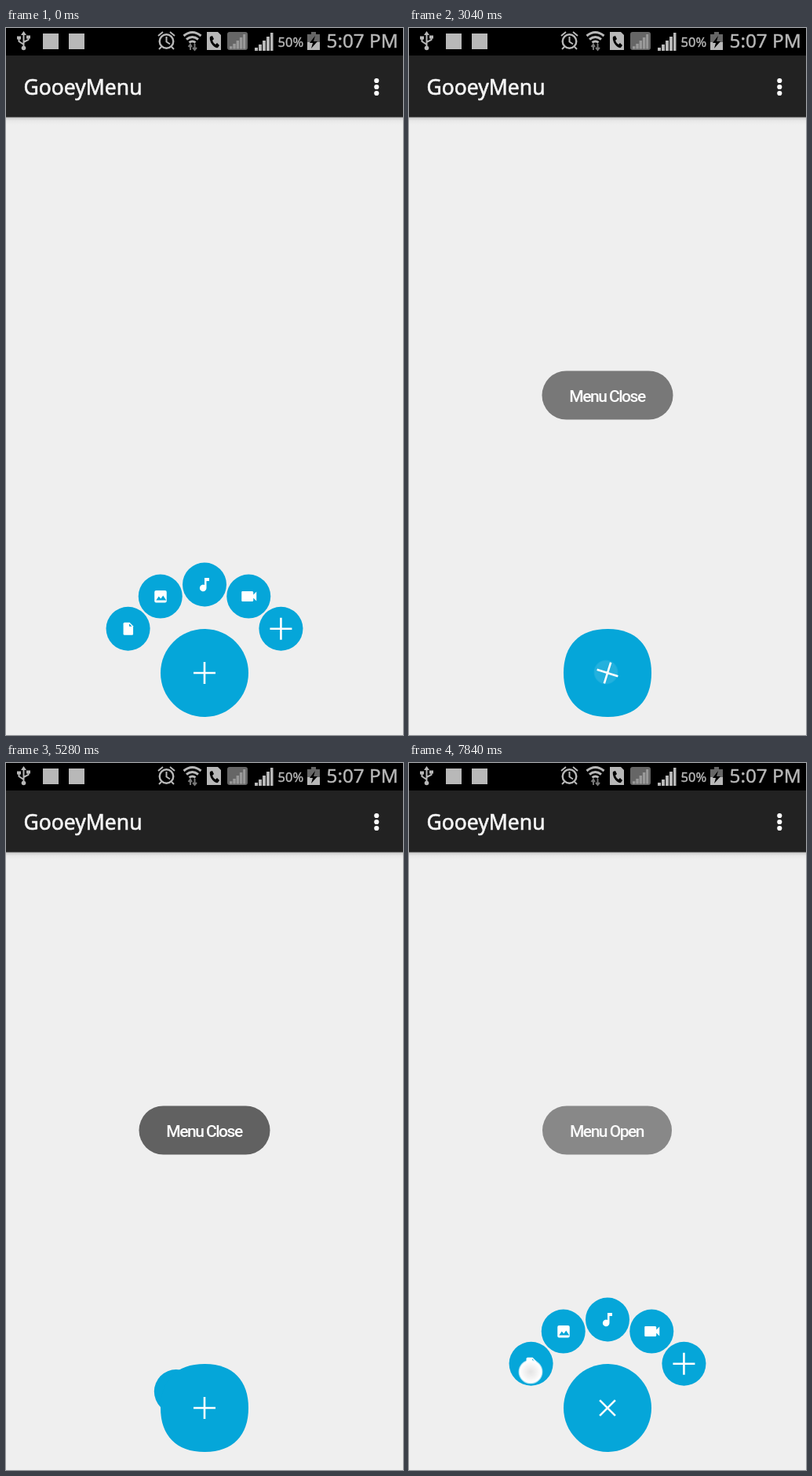
Animation, 506 px wide and 900 px high, one loop 8 s. Source, as an HTML page:

```html
<!DOCTYPE html>
<html lang="en">
<head>
<meta charset="utf-8">
<title>GooeyMenu</title>
<style>
  html, body { margin: 0; width: 100%; height: 100%; overflow: hidden; background: #efefef; }
  svg { display: block; width: 506px; height: 900px; }
  .bar { font-family: "Noto Sans", sans-serif; fill: #b8b8b8; }
  .bar text { stroke: #b8b8b8; stroke-width: .4; }
  .title { font: 26.5px "Noto Sans", sans-serif; fill: #f6f6f6; stroke: #f6f6f6; stroke-width: .6; }
  .toast text { font: 500 21px Roboto, sans-serif; letter-spacing: -1.5px; fill: #fff; text-anchor: middle; }
  .toast rect { fill: #616161; }
  .blue { fill: #05a6d9; }
  .plus { stroke: #fff; stroke-width: 2.6; fill: none; }
  .line { stroke: #b8b8b8; stroke-width: 2; fill: none; }
</style>
</head>
<body>
<svg viewBox="0 0 506 900">
  <defs>
    <linearGradient id="shade" x2="0" y2="1">
      <stop stop-color="#a8a8a8"/>
      <stop offset=".2" stop-color="#d2d2d2"/>
      <stop offset=".5" stop-color="#e8e8e8"/>
      <stop offset="1" stop-color="#efefef"/>
    </linearGradient>
    <radialGradient id="glow">
      <stop stop-color="#e4e4e4"/>
      <stop offset=".55" stop-color="#f4f4f4"/>
      <stop offset=".88" stop-color="#fff"/>
      <stop offset="1" stop-color="#fff" stop-opacity=".5"/>
    </radialGradient>
    <path id="bars" d="M0 23v-4h4v4zM5 23v-8h4v8zM10 23v-13h4v13zM15 23v-18h4v18zM20 23v-23h3.500v23z"/>
  </defs>

  <rect width="506" height="900" fill="#efefef"/>
  <rect y="113" width="506" height="10" fill="url(#shade)"/>
  <rect width="506" height="36" fill="#000"/>
  <rect y="35" width="506" height="78.500" fill="#222"/>

  <!-- status bar -->
  <g class="bar">
    <path class="line" d="M22.500 8v17M22.500 21l-6-4v-4M22.500 18l6-3v-4"/>
    <path d="M22.500 4l3.500 5h-7zM14 10.500h5v4h-5zM26 9.500h5v4h-5z"/>
    <circle cx="22.500" cy="25.500" r="2.800"/>
    <rect x="47" y="7" width="20" height="20"/>
    <rect x="80" y="7" width="20" height="20"/>
    <g class="line">
      <circle cx="204.500" cy="17" r="8.800" stroke-width="2.400"/>
      <path d="M204.500 11v6.500l4.500 3M194 10l6-5M215 10l-6-5M198 24l-3 3M211 24l3 3"/>
      <path stroke-width="3" d="M226.500 10q11-9 22 0M230 14.500q7.500-6 15 0M233.500 18.500q4-3 8 0"/>
      <path stroke="#777" d="M235 28v-7M232.500 24l2.500-3 2 3M240.500 20v7M238 25l2.500 3 2.500-3"/>
    </g>
    <path d="M256 5h14l4 4v19h-18z"/>
    <path fill="#000" d="M260 11l3-1 2 4-2 2q1 3 4 5l2-2 3 3-2 3q-4 1-8-5-3-5-2-9z"/>
    <rect x="282" y="5" width="26" height="23" rx="3" fill="#666"/>
    <use href="#bars" fill="#999" transform="translate(285 8) scale(.86 .8)"/>
    <use href="#bars" x="317" y="6"/>
    <text x="346.500" y="23.500" font-size="16.500">50%</text>
    <path fill="#666" d="M389 5h6v3h5v10h-16V8h5z"/>
    <path d="M384 18h16v10h-16z"/>
    <path fill="#000" d="M394 10l-7 9h4l-2 7 8-9h-5z"/>
    <text x="408.500" y="25" font-size="24.300">5:07 PM</text>
  </g>

  <!-- action bar -->
  <text class="title" x="22.500" y="85">GooeyMenu</text>
  <g fill="#fff">
    <circle cx="472.300" cy="67" r="3.100"/>
    <circle cx="472.300" cy="75" r="3.100"/>
    <circle cx="472.300" cy="83" r="3.100"/>
  </g>

  <g id="close" class="toast">
    <rect x="169.500" y="436.500" width="167" height="62" rx="31"/>
    <text x="252.500" y="476">Menu Close</text>
  </g>
  <g id="open" class="toast">
    <rect x="170" y="436.500" width="165" height="62" rx="31"/>
    <text x="252" y="476">Menu Open</text>
  </g>

  <!-- menu items, right to left -->
  <g fill="#fff">
    <g class="item"><circle class="blue" r="28"/><path class="plus" d="M-14 0H14M0-14V14"/></g>
    <g class="item"><circle class="blue" r="28"/><path d="M-8-6.500H4.500q1.500 0 1.500 1.500v3l4-4V6l-4-4v3q0 1.500-1.500 1.500H-8q-1 0-1-1v-11q0-1 1-1z"/></g>
    <g class="item"><circle class="blue" r="28"/><path d="M0-8.500H6v4H2.500V4.500A4.300 4.300 0 1 1 0 .5z"/></g>
    <g class="item"><circle class="blue" r="28"/><rect x="-7.500" y="-7.500" width="15.500" height="15.500" rx="2"/><path class="blue" d="M-5.500 5l3.500-5 2.500 3 3-4 4 6z"/></g>
    <g class="item"><circle class="blue" r="28"/><path d="M-4.500-8H2l4.500 4.500V6.500Q6.500 8 5 8h-9.500Q-6 8-6 6.500v-13Q-6-8-4.500-8z"/><path class="blue" d="M1.500-6.500V-3H5z"/></g>
  </g>

  <g transform="translate(253 821)">
    <path id="blob" class="blue"/>
    <path id="cross" class="plus" d="M-14 0H14M0-14V14"/>
  </g>
  <circle id="touch" r="15.500" fill="url(#glow)"/>
</svg>

<script>
  const LOOP = 8000, STEP = 160;
  const CENTER = { x: 253, y: 821 }, GAP = 112.5, SIZE = 56;
  const TURN = 330, WOBBLE = 226, SETTLED = 6720;
  const ITEM_TAP = 7680, TOAST_END = 7750;

  // Each tap presses at `down` and toggles the menu at `up`.
  const taps = [
    { down: 960, up: 1500, open: false },
    { down: 2660, up: 2835, open: true },
    { down: 4240, up: 4357, open: false },
    { down: 5560, up: 5700, open: true }
  ];

  const $ = id => document.getElementById(id);
  const items = [...document.querySelectorAll('.item')];
  const clamp = v => Math.min(1, Math.max(0, v));

  function anticipateOvershoot(p) {
    const pull = u => u * u * (4 * u - 3) / 2;
    return p < 0.5 ? pull(2 * p) : 1 - pull(2 - 2 * p);
  }

  function placeItems(t, tap) {
    items.forEach((item, i) => {
      let reach = 1;
      if (tap && t < SETTLED) {
        const delay = tap.open ? 500 - i * 100 : i * 100;
        const p = anticipateOvershoot(clamp((t - tap.up - delay) / 1000));
        reach = tap.open ? p : 1 - p;
      }
      const angle = Math.PI / 6 * (i + 1), r = GAP * reach;
      const x = CENTER.x + r * Math.cos(angle), y = CENTER.y - r * Math.sin(angle);
      item.setAttribute('transform', `translate(${x} ${y})`);
    });
  }

  function blobPath(bulge) {
    const r = SIZE, k = r * (0.552 + bulge);
    return `M0 ${-r}C${k} ${-r} ${r} ${-k} ${r} 0S${k} ${r} 0 ${r}` +
      `S${-r} ${k} ${-r} 0S${-k} ${-r} 0 ${-r}`;
  }

  function drawButton(t, tap) {
    const pressed = taps.find(p => t >= p.down && t < p.up);
    const since = pressed ? t - pressed.down : tap ? t - tap.up : Infinity;
    const moving = pressed || (since < 1250 && t < SETTLED);
    const bulge = moving ? 0.045 * (1 + Math.cos(2 * Math.PI * since / WOBBLE)) : 0;
    $('blob').setAttribute('d', blobPath(bulge));

    const turn = tap ? clamp((t - tap.up) / TURN) ** 2 : 0;
    const angle = tap ? 45 * (tap.open ? turn : 1 - turn) : 0;
    $('cross').setAttribute('transform', `rotate(${angle})`);
  }

  function drawToasts(t, tap, previous) {
    const alpha = { open: 0, close: 0 };
    if (tap) {
      const since = t - tap.up, name = tap.open ? 'open' : 'close';
      alpha[name] = 1 - (1 - clamp((since - 220) / 400)) ** 2;
      if (t > TOAST_END) alpha[name] = 1 - clamp((t - TOAST_END) / 320);
      if (previous) alpha[previous.open ? 'open' : 'close'] = 1 - clamp((since - 185) / 120);
    }
    for (const name in alpha) $(name).setAttribute('opacity', alpha[name]);
  }

  function drawTouch(t) {
    const onItem = t >= ITEM_TAP;
    const tap = taps.find(p => t >= p.down && t < p.up + 250);
    const alpha = onItem ? 1 : tap ? 0.7 * (1 - clamp((t - tap.up) / 250)) : 0;
    const touch = $('touch');
    touch.setAttribute('opacity', alpha);
    touch.setAttribute('cx', onItem ? 155 : 251);
    touch.setAttribute('cy', onItem ? 775 : 820);
  }

  function draw(now) {
    const t = Math.floor(now % LOOP / STEP) * STEP;
    const done = taps.filter(p => p.up <= t);
    const tap = done[done.length - 1], previous = done[done.length - 2];
    placeItems(t, tap);
    drawButton(t, tap);
    drawToasts(t, tap, previous);
    drawTouch(t);
  }

  const start = performance.now();
  function loop() {
    draw(performance.now() - start);
    requestAnimationFrame(loop);
  }
  loop();
</script>
</body>
</html>
```
